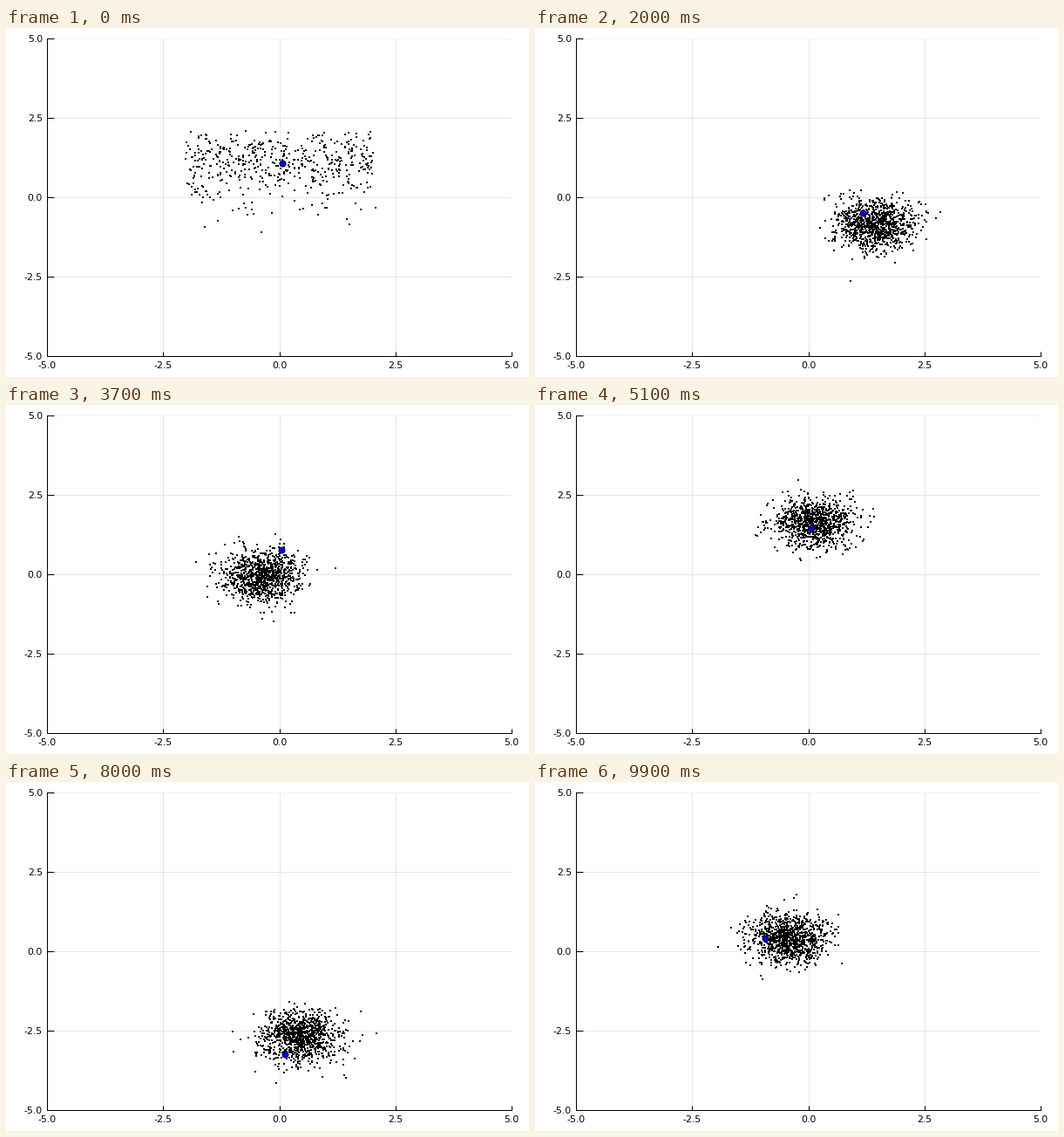
These frames come from a looping animation (600 px wide and 400 px high, 10 s). A matplotlib script:

```python
import numpy as np
import matplotlib.pyplot as plt
from matplotlib.animation import FuncAnimation

FRAMES, COUNT = 100, 1000
DPI = 100
PX = 72 / DPI
SPREAD = np.array([0.42, 0.40])
MEMORY = 0.7  # share of each particle's offset kept per step
rng = np.random.default_rng(12)
steps = np.arange(FRAMES)

# way points of the true position and of the estimate
marks = [0, 20, 37, 51, 65, 80, 99]
true_x = [0.06, 1.18, 0.05, 0.07, 0.32, 0.12, -0.93]
true_y = [1.06, -0.49, 0.76, 1.45, -1.15, -3.24, 0.42]
guess_x = [0, 1.45, -0.36, 0.1, -0.3, 0.46, -0.42]
guess_y = [1, -0.86, -0.06, 1.62, -0.85, -2.7, 0.4]


def path(x, y):
    return np.column_stack([np.interp(steps, marks, v) for v in (x, y)])


def bridge(scale):
    """Random walk pinned to zero at the way points."""
    walk = np.cumsum(rng.normal(0, scale, FRAMES))
    return walk - np.interp(steps, marks, walk[marks])


wander = np.column_stack([bridge(0.12), bridge(0.12)])
dots = path(true_x, true_y) + wander
centres = path(guess_x, guess_y) + 0.6 * wander


def first_cloud():
    """Uniform square thinned by the first measurement, then doubled."""
    p = rng.uniform(-2, 2, (6000, 2))
    keep = rng.random(6000) < np.exp(-((p[:, 1] - 1.2) / 1.1) ** 2)
    parents = p[keep][:COUNT // 2]
    parents = parents + rng.normal(0, 0.06, parents.shape)
    return np.repeat(parents, 2, axis=0)


def filter_run():
    z = (first_cloud() - centres[0]) / SPREAD
    for centre in centres:
        yield centre + SPREAD * z
        z = MEMORY * z + np.sqrt(1 - MEMORY**2) * rng.normal(size=z.shape)


clouds = list(filter_run())

plt.rcParams["font.family"] = "DejaVu Sans"
fig = plt.figure(figsize=(6, 4), dpi=DPI, facecolor="white")
ax = fig.add_axes([47 / 600, 24 / 400, 533 / 600, 364 / 400])
ax.set(xlim=(-5, 5), ylim=(-5, 5))
ticks = np.linspace(-5, 5, 5)
labels = [f"{t:.1f}" for t in ticks]
ax.set_xticks(ticks, labels)
ax.set_yticks(ticks, labels)
ax.tick_params(direction="in", width=PX, labelsize=11 * PX)
ax.tick_params(axis="x", length=5 * PX, pad=6 * PX)
ax.tick_params(axis="y", length=8 * PX, pad=5 * PX)
ax.spines[["top", "right"]].set_visible(False)
ax.spines[["left", "bottom"]].set_linewidth(PX)
for t in ticks[1:]:
    shade = "#f2f2f2" if t == 5 else "#e6e6e6"
    ax.axhline(t, color=shade, lw=PX, zorder=0)
    ax.axvline(t, color=shade, lw=PX, zorder=0)

swarm, = ax.plot([], [], "s", ms=2.5 * PX, color="black", mew=0, snap=False,
                 zorder=3)
dot, = ax.plot([], [], "o", ms=7 * PX, mfc="#0000ff", mec="black", mew=PX,
               zorder=4)


def draw(k):
    swarm.set_data(*clouds[k].T)
    dot.set_data(dots[k, :1], dots[k, 1:])
    return swarm, dot


anim = FuncAnimation(fig, draw, frames=FRAMES, interval=100, repeat=True,
                     repeat_delay=0)
plt.show()
```
